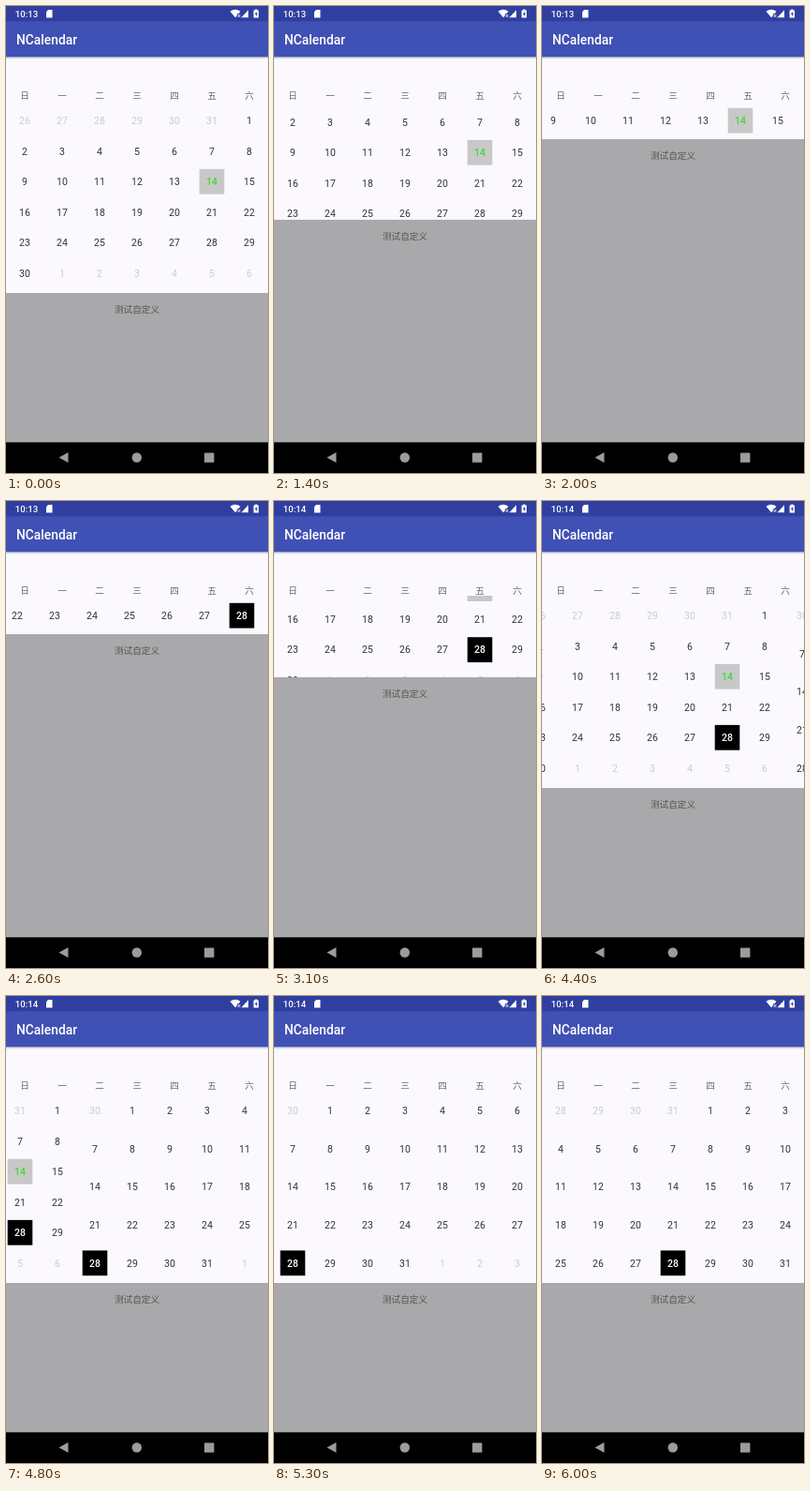
An HTML page that plays this animation: 280x498 px, repeating every 8000 ms.

```html
<!DOCTYPE html>
<html lang="zh">
<head>
<meta charset="utf-8">
<title>NCalendar</title>
<style>
html, body { margin: 0; width: 100%; height: 100%; overflow: hidden; background: #000; }
svg { display: block; width: 100vw; height: 100vh; }
text { font-family: Roboto, "Noto Sans CJK SC", "Noto Sans CJK", sans-serif; }
.day { font-size: 10.5px; text-anchor: middle; fill: #333; }
.day.other { fill: #ccc; }
.day.today { fill: #16e016; }
.day.picked { fill: #fff; font-weight: 500; }
.cjk { font-family: "Noto Sans CJK SC", "Noto Sans CJK", sans-serif; font-size: 9.6px; text-anchor: middle; fill: #666; }
</style>
</head>
<body>
<svg viewBox="0 0 280 498" preserveAspectRatio="none">
  <defs>
    <clipPath id="below"><rect y="101" width="280" height="364"/></clipPath>
    <linearGradient id="shade" x2="0" y2="1">
      <stop stop-color="#c4c2c8"/><stop offset="1" stop-color="#fbf9fd"/>
    </linearGradient>
  </defs>
  <rect width="280" height="498" fill="#fbf9fd"/>
  <rect y="54" width="280" height="3" fill="url(#shade)"/>
  <rect y="16" width="280" height="38.3" fill="#3f51b5"/>
  <rect width="280" height="16.3" fill="#303f9f"/>
  <text x="11" y="41" font-size="13.8" font-weight="500" fill="#fff">NCalendar</text>
  <text id="clock" x="9.8" y="11.8" font-size="9.6" font-weight="500" fill="#fff"></text>
  <g fill="#fff">
    <path d="M45 4h4.5v8.5h-6.5V6.2z"/>
    <path d="M239.5 5.8Q245 1.6 250.5 5.8L248.5 8.3H246.8V10.5L245 12.3z"/>
    <path d="M247.6 9l2.8 3M250.4 9l-2.8 3" stroke="#fff" stroke-width=".8"/>
    <path d="M259 4.3V12.3H251.5z"/>
    <path d="M266.3 3.5h2v1h1.7v8h-5.4v-8h1.7z"/>
    <path d="M267.8 5.8L265.9 9h1.2v2.2L268.9 8h-1.1z" fill="#303f9f"/>
  </g>
  <g id="header"></g>
  <g id="calendar" clip-path="url(#below)"></g>
  <g id="panel">
    <rect width="280" height="400" fill="#a9a8aa"/>
    <text class="cjk" x="140" y="20.6" style="fill:#555">测试自定义</text>
  </g>
  <rect y="465" width="280" height="33" fill="#000"/>
  <rect y="465" width="280" height="1" fill="#20382c"/>
  <g fill="#9c9c9c">
    <path d="M56.5 481.5L66.5 476V487z"/>
    <circle cx="139.8" cy="481.5" r="5.2"/>
    <rect x="212" y="476.4" width="10.4" height="10.4" rx=".6"/>
  </g>
</svg>
<script>
const LOOP = 8000, TICK = 100, WIDTH = 280, COL = 40;
const FIRST_ROW = 122.2, ROW_SPAN = 162.6, OPEN = 306, TRAVEL = 164;
const $ = id => document.getElementById(id);

// lead: days of the previous month shown before the 1st
const june = { lead: 6, before: 31, days: 30, rows: 6, today: 14 };
const july = { lead: 1, before: 30, days: 31, rows: 5 };
const august = { lead: 4, before: 31, days: 31, rows: 5 };

const rowY = (month, row) => FIRST_ROW + row * ROW_SPAN / (month.rows - 1);

function cell(month, index, x, y, picked) {
  const n = index - month.lead + 1;
  const inside = n > 0 && n <= month.days;
  const label = n < 1 ? n + month.before : inside ? n : n - month.days;
  const kind = !inside ? "other" : n === picked ? "picked" : n === month.today ? "today" : "";
  const fill = { picked: "#000", today: "#c8c8c8" }[kind];
  const box = fill ? `<rect x="${x - 13.3}" y="${y - 13.4}" width="26.6" height="26.8" fill="${fill}"/>` : "";
  return `${box}<text class="day ${kind}" x="${x}" y="${y + 3.8}">${label}</text>`;
}

function week(month, row, x, y, picked) {
  let out = "";
  for (let c = 0; c < 7; c++) out += cell(month, row * 7 + c, x + 20 + c * COL, y, picked);
  return out;
}

function page(month, x, dy, picked) {
  let out = "";
  for (let r = 0; r < month.rows; r++) out += week(month, r, x, rowY(month, r) + dy, picked);
  return out;
}

// Value of a gesture sampled once per tick; holds the last value afterwards
function gesture(t, start, values) {
  const i = Math.floor((t - start) / TICK);
  return i < 0 ? 0 : values[Math.min(i, values.length - 1)];
}

const collapse = t => gesture(t, 1200, [.1, .27, .476, .68, .85, .96, 1]);
const expand = t => t >= 4100 ? 1 : gesture(t, 2900, [.04, .14, .28, .46, .65, .8, .9, .96, .993]);
const weekScroll = t => gesture(t, 2000, [8, 108, 230, 272, 286, 400, 528, 557, 560]);
const monthScroll = t => gesture(t, 4400, [22, 60, 105, 150, 205, 245, 265, 275, 279, 280])
  + gesture(t, 5800, [97, 273, 280]);

function render(t) {
  const folded = t < 2900 ? collapse(t) : 1 - expand(t);
  const picked = t < 2200 ? 0 : t < 2500 ? 21 : 28;
  let out = "";
  if (t >= 2000 && t < 2900) {
    const s = weekScroll(t);
    for (let i = 0; i < 3; i++) out += week(june, 2 + i, i * WIDTH - s, FIRST_ROW, picked);
  } else {
    const s = monthScroll(t);
    const dy = folded * (FIRST_ROW - rowY(june, t < 2000 ? 2 : 4));
    if (s < WIDTH) out += page(june, -s, dy, picked);
    if (s > 0 && s < 2 * WIDTH) out += page(july, WIDTH - s, 0, t >= 4700 ? 28 : 0);
    if (s > WIDTH) out += page(august, 2 * WIDTH - s, 0, t >= 5900 ? 28 : 0);
  }
  $("calendar").innerHTML = out;
  $("panel").setAttribute("transform", `translate(0 ${OPEN - TRAVEL * folded})`);
  $("clock").textContent = t < 2800 ? "10:13" : "10:14";
}

$("header").innerHTML = [..."日一二三四五六"]
  .map((d, i) => `<text class="cjk" x="${20 + i * COL}" y="98.6">${d}</text>`).join("");

const began = performance.now();
let shown = -1;
function loop() {
  const t = Math.floor((performance.now() - began) % LOOP / TICK) * TICK;
  if (t !== shown) render(shown = t);
  requestAnimationFrame(loop);
}
loop();
</script>
</body>
</html>
```
